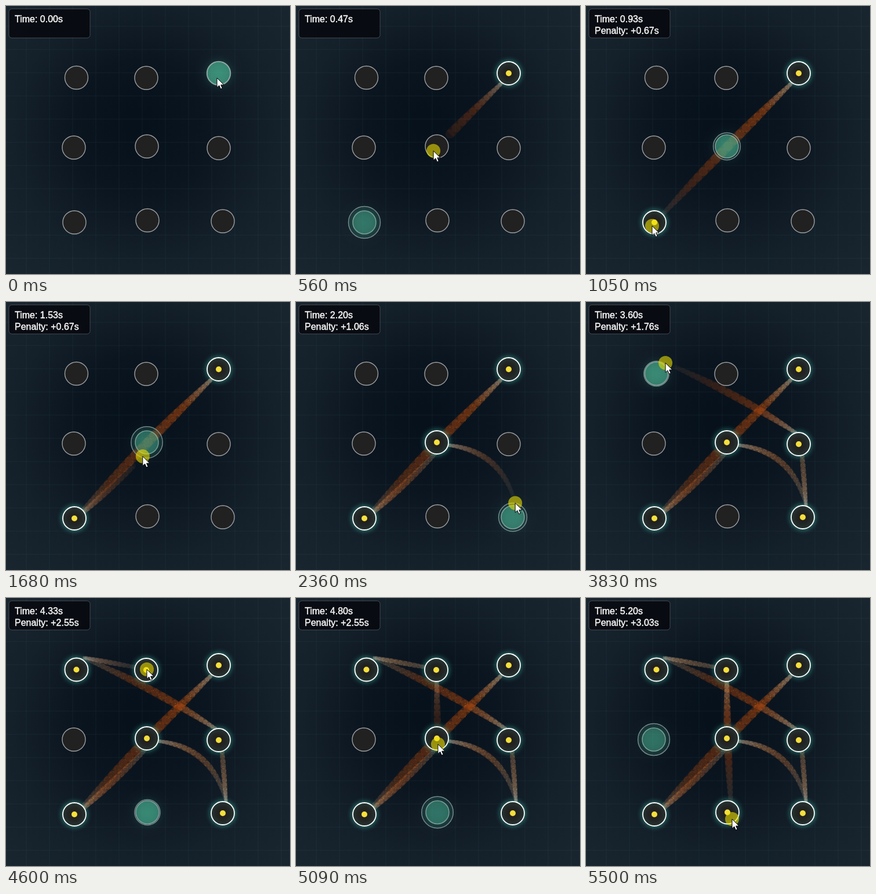
An HTML page with a canvas for the animation above (5570 ms loop, 490 by 462 pixels).

```html
<!DOCTYPE html>
<html lang="en">
<head>
<meta charset="utf-8">
<title>Connect the dots</title>
<style>
  html, body { margin: 0; height: 100%; overflow: hidden; background: #111d27; }
  canvas { display: block; }
</style>
</head>
<body>
<canvas id="stage" width="490" height="462"></canvas>
<script>
const W = 490, H = 462, LOOP = 5570, STEP = 70, TAU = 2 * Math.PI;
const c = document.getElementById('stage').getContext('2d');

// Targets in the order they light up: x, y, step of the hit, penalty from then on
const nodes = [
  [367, 116, 1, 0], [118, 373, 13, .67], [243, 242, 26, 1.06],
  [374, 371, 37, 1.45], [367, 245, 45, 1.76], [121.5, 123.5, 56, 2.2],
  [242, 124, 64, 2.55], [244, 369.5, 78, 3.03], [117, 244, Infinity, 0]
].map(([x, y, hit, penalty]) => ({ x, y, hit, penalty }));

// Pointer strokes: step of leaving and arriving, end point, sideways bend
let from = { x: 364, y: 124 };
const strokes = [
  [1, 15, 114, 379, -.015], [16, 26.5, 255, 246, -.03], [26.5, 35, 380, 354, .37],
  [38, 46, 370, 231, 0], [46, 56, 130, 102, -.05], [58, 66, 243, 123, 0],
  [67, 79, 252, 381, -.02]
].map(([leave, arrive, x, y, bend]) => {
  const dx = x - from.x, dy = y - from.y;
  const mid = { x: from.x + dx / 2 + dy * bend, y: from.y + dy / 2 - dx * bend };
  const stroke = { leave, arrive, from, mid, to: { x, y }, length: Math.hypot(dx, dy) };
  from = stroke.to;
  return stroke;
});

const mix = (a, b, u) => a + (b - a) * u;
const clamp = u => Math.max(0, Math.min(1, u));
const smooth = u => u * u * (3 - 2 * u);
const quad = (a, b, d, u) => mix(mix(a, b, u), mix(b, d, u), u);

let seed = 7;
const random = () => (seed = seed * 16807 % 2147483647) / 2147483647;

function pointerAt(step) {
  const s = strokes.findLast(s => s.leave <= step) || strokes[0];
  const u = smooth(clamp((step - s.leave) / (s.arrive - s.leave)));
  return {
    x: quad(s.from.x, s.mid.x, s.to.x, u),
    y: quad(s.from.y, s.mid.y, s.to.y, u),
    r: 2.5 + s.length / 60 * Math.sin(Math.PI * u),
    alpha: mix(.65, .18, u)
  };
}

// Long strokes leave thick orange beads, slow ends thin pale ones
function makeTrail() {
  const trail = [];
  let last = pointerAt(1);
  for (let step = 1; step < 79; step += .02) {
    const p = pointerAt(step);
    if (Math.hypot(p.x - last.x, p.y - last.y) < 1.8 * p.r) continue;
    const heat = clamp((p.r - 2) / 4.5);
    p.born = step;
    p.last = last;
    p.rgb = `190,${mix(200, 75, heat)},${mix(190, 12, heat)}`;
    p.specks = Array.from({ length: 6 }, () => {
      const angle = random() * TAU, d = Math.sqrt(random()) * p.r;
      return [p.x + d * Math.cos(angle), p.y + d * Math.sin(angle)];
    });
    trail.push(p);
    last = p;
  }
  return trail;
}
const trail = makeTrail();

function circle(x, y, r, fill, stroke, width) {
  c.beginPath();
  c.arc(x, y, r, 0, TAU);
  if (fill) { c.fillStyle = fill; c.fill(); }
  if (stroke) { c.strokeStyle = stroke; c.lineWidth = width; c.stroke(); }
}

function glow(color, blur) {
  c.shadowColor = color;
  c.shadowBlur = blur;
}

function drawBackground() {
  const g = c.createRadialGradient(225, 200, 20, 245, 231, 340);
  g.addColorStop(0, '#07111b');
  g.addColorStop(.3, '#0b151f');
  g.addColorStop(.65, '#14202a');
  g.addColorStop(1, '#1a262f');
  c.fillStyle = g;
  c.fillRect(0, 0, W, H);
  c.fillStyle = 'rgba(100,200,200,.028)';
  for (let p = 34; p < W; p += 40) {
    c.fillRect(p, 0, 2, H);
    c.fillRect(0, p, W, 2);
  }
}

function drawTrail(step) {
  for (const p of trail) {
    const age = step - p.born;
    if (age < .7) break;
    const alpha = p.alpha * Math.min(1, .25 + age / 8);
    c.beginPath();
    c.moveTo(p.last.x, p.last.y);
    c.lineTo(p.x, p.y);
    c.lineWidth = 2 * p.r;
    c.strokeStyle = `rgba(${p.rgb},${alpha * .55})`;
    c.stroke();
    circle(p.x, p.y, p.r, `rgba(${p.rgb},${alpha * .55})`);
    if (age > 8 && p.r > 3.5) {
      c.fillStyle = `rgba(215,185,40,${alpha * .7})`;
      for (const [x, y] of p.specks) c.fillRect(x, y, 1, 1);
    }
  }
}

function drawNodes(step) {
  const active = nodes.find(n => n.hit > step);
  const pulse = .5 - .5 * Math.cos(TAU * ((step - 55) / 5.44 + .13));
  for (const n of nodes) {
    const { x, y } = n;
    if (n.hit <= step) {
      glow('rgba(80,235,205,.5)', 10);
      circle(x, y, 20, '#222', '#fff', 1.8);
      glow('transparent', 0);
      circle(x, y, 5, '#f5df3c');
    } else if (n === active) {
      glow('rgba(70,210,175,.45)', 18);
      circle(x, y, 20, `rgba(80,190,155,${mix(.59, .36, pulse)})`);
      glow('transparent', 0);
      circle(x, y, 20, '', 'rgba(170,190,185,.7)', 1.5);
      circle(x, y, 20.5 + 7 * pulse, `rgba(80,190,155,${.14 * pulse})`, 'rgba(160,180,175,.7)', 1.5);
    } else {
      circle(x, y, 20, '#212121', '#9c9fa1', 1.4);
    }
  }
}

function drawPointer(step) {
  const { x, y } = pointerAt(step);
  if (step > 0) circle(x, y, 12, 'rgba(240,225,0,.58)');
  const arrow = [[0, 0], [0, 16.5], [3.8, 13], [6.4, 19], [9.2, 17.8], [6.7, 12], [12, 12]];
  c.beginPath();
  for (const [dx, dy] of arrow) c.lineTo(x + dx, y + dy);
  c.closePath();
  c.fillStyle = '#fff';
  c.fill();
  c.strokeStyle = '#000';
  c.lineWidth = 1;
  c.stroke();
}

function label(text, y) {
  c.fillText(text, 15, y);
  c.strokeText(text, 15, y);
}

function drawPanel(step) {
  c.beginPath();
  c.roundRect(5, 5, 140, 50, 5);
  c.fillStyle = 'rgba(5,7,12,.8)';
  c.fill();
  c.strokeStyle = 'rgba(255,255,255,.22)';
  c.lineWidth = 1;
  c.stroke();
  c.font = '16px "Liberation Sans", Arial, sans-serif';
  c.fillStyle = c.strokeStyle = '#fff';
  c.lineWidth = .4;
  label(`Time: ${(Math.max(0, step - 1) / 15).toFixed(2)}s`, 28);
  const last = nodes.findLast(n => n.hit <= step);
  if (last && last.penalty) label(`Penalty: +${last.penalty.toFixed(2)}s`, 48);
}

function draw() {
  const t = performance.now() % LOOP;
  // two steps are slightly shorter than the rest
  const skipped = t < 2150 ? 0 : t < 5010 ? 20 : 30;
  const step = Math.floor((t + skipped) / STEP);
  drawBackground();
  drawTrail(step);
  drawNodes(step);
  drawPointer(step);
  drawPanel(step);
  requestAnimationFrame(draw);
}
draw();
</script>
</body>
</html>
```
